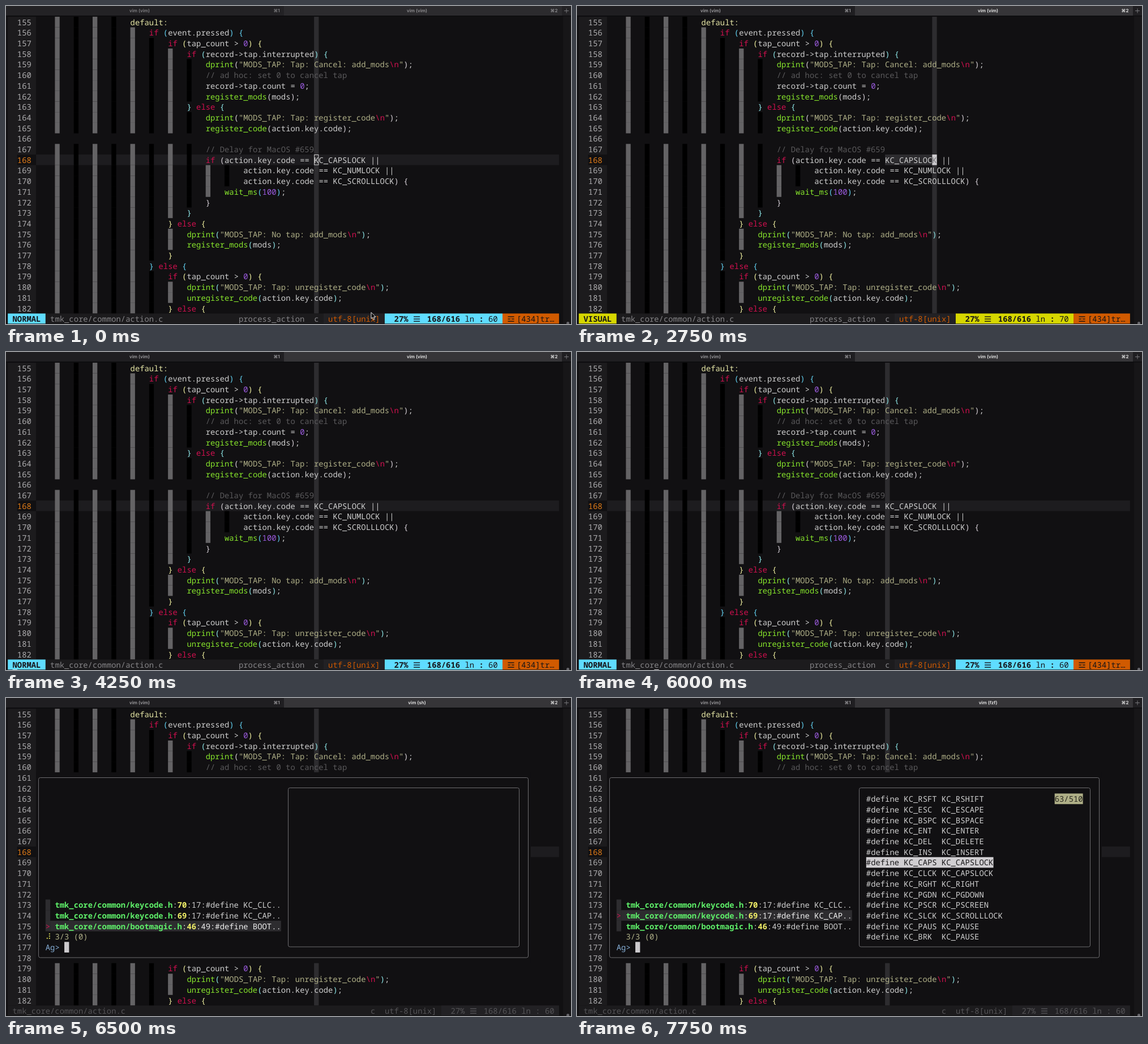
An HTML page with a canvas that plays this animation: 998 px wide and 561 px high, repeating every 8 s.

```html
<!DOCTYPE html>
<html lang="en">
<head>
<meta charset="utf-8">
<title>Searching a keycode in vim</title>
<style>
html, body { margin: 0; height: 100%; overflow: hidden; background: #111012; }
canvas { display: block; }
</style>
</head>
<body>
<canvas id="stage" width="998" height="561"></canvas>
<script>
const ctx = document.getElementById('stage').getContext('2d');
const LOOP = 8000, CELL = 8.322, ROW = 18.7, LEFT = 3.2, GUTTER = 6, TOP = 18.9, FIRST = 155;
const MONO = '"Noto Sans Mono", "DejaVu Sans Mono", monospace';
const UI = 'Inter, "DejaVu Sans", sans-serif';
const BG = '#111012', PANEL = '#1c1b1d', FG = '#cfcfcf', DIM = '#2d2c2f', RED = '#d0104f',
  TAN = '#afaf87', CYAN = '#5fdcff', YELLOW = '#d7d700', ORANGE = '#d05a00';
const RAINBOW = ['#62d2f2', '#f0f0a0', '#8fe9ea', '#d6cfd6'];

const T = { focus: 500, visual: 2250, extend: 2500, yank: 3250, command: 4000,
  paste: 5500, popup: 6250, loaded: 7000, up: 7250 };

const CODE = `
                    default:
                        if (event.pressed) {
                            if (tap_count > 0) {
                                if (record->tap.interrupted) {
                                    dprint("MODS_TAP: Tap: Cancel: add_mods\\n");
                                    // ad hoc: set 0 to cancel tap
                                    record->tap.count = 0;
                                    register_mods(mods);
                                } else {
                                    dprint("MODS_TAP: Tap: register_code\\n");
                                    register_code(action.key.code);

                                    // Delay for MacOS #659
                                    if (action.key.code == KC_CAPSLOCK ||
                                            action.key.code == KC_NUMLOCK ||
                                            action.key.code == KC_SCROLLLOCK) {
                                        wait_ms(100);
                                    }
                                }
                            } else {
                                dprint("MODS_TAP: No tap: add_mods\\n");
                                register_mods(mods);
                            }
                        } else {
                            if (tap_count > 0) {
                                dprint("MODS_TAP: Tap: unregister_code\\n");
                                unregister_code(action.key.code);
                            } else {`.slice(1).split('\n');

const DEFINES = `RSFT RSHIFT
ESC ESCAPE
BSPC BSPACE
ENT ENTER
DEL DELETE
INS INSERT
CAPS CAPSLOCK
CLCK CAPSLOCK
RGHT RIGHT
PGDN PGDOWN
PSCR PSCREEN
SLCK SCROLLLOCK
PAUS PAUSE
BRK PAUSE`.split('\n').map(line => {
  const [short, long] = line.split(' ');
  return `#define KC_${short.padEnd(4)} KC_${long}`;
});

const MATCHES = [
  ['keycode.h', '70', ':17:#define KC_CLC..'],
  ['keycode.h', '69', ':17:#define KC_CAP..'],
  ['bootmagic.h', '46', ':49:#define BOOT..'],
];

const TOKEN = /(?<comment>\/\/.*)|(?<string>"(?=\))|"[^"\\]*)|(?<keyword>\\n|\b(?:if|else)\b)|(?<label>default:)|(?<call>\w+(?=\())|(?<number>\b\d+\b)|(?<bracket>[(){}])|\w+|\S/g;
const COLORS = { comment: '#5a595b', string: TAN, keyword: RED, label: '#e6e6a6',
  call: '#87e52c', number: '#9c5be0' };

function highlight(lines) {
  let depth = 0;
  return lines.map(line => [...line.matchAll(TOKEN)].map(m => {
    const kind = Object.keys(m.groups).find(k => m.groups[k] !== undefined);
    let color = COLORS[kind] || FG;
    if (kind === 'bracket') {
      const level = '({'.includes(m[0]) ? depth++ : --depth;
      color = RAINBOW[level % RAINBOW.length];
    }
    return { text: m[0], col: m.index, color };
  }));
}
const TOKENS = highlight(CODE);

const colX = col => LEFT + col * CELL;
const rowY = row => TOP + row * ROW;

function rect(x, y, w, h, color) {
  ctx.fillStyle = color;
  ctx.fillRect(x, y, w, h);
}

function cells(col, row, count, color, rows = 1) {
  rect(colX(col), rowY(row), count * CELL, rows * ROW, color);
}

function text(str, col, row, color = FG, weight = 400) {
  ctx.font = `${weight} 13.87px ${MONO}`;
  ctx.fillStyle = color;
  ctx.fillText(str, colX(col), rowY(row) + 14.7);
}

function label(str, x, color) {
  ctx.font = `600 8px ${UI}`;
  ctx.textAlign = 'center';
  ctx.fillStyle = color;
  ctx.fillText(str, x, 11.3);
  ctx.textAlign = 'left';
}

function bars(col, color, split) {
  const x = colX(col) + 1.2, y = rowY(28) + 5;
  for (let i = 0; i < 3; i++) rect(x, y + i * 4, 11, 1.4, color);
  if (split) rect(x + 4, y + 4, 3, 1.4, ORANGE);
}

function frame(x, y, w, h) {
  ctx.strokeStyle = '#6d6c6f';
  ctx.lineWidth = 1;
  ctx.beginPath();
  ctx.roundRect(x, y, w, h, 3);
  ctx.stroke();
}

function drawTabs(t) {
  const focused = t >= T.focus;
  const title = t < T.popup ? 'vim' : t < T.loaded ? 'sh' : 'fzf';
  const idle = focused ? '#a2a1a4' : '#838285', active = focused ? '#f0f0f0' : '#939295';
  rect(0, 0, 998, 17, focused ? '#1f1e21' : '#232225');
  rect(491, 0, 491, 17, focused ? '#363538' : '#2c2b2e');
  rect(0, 17, 998, 1, '#08080a');
  label('vim (vim)', 236, idle);
  label('⌘1', 478, idle);
  label(`vim (${title})`, 726, active);
  label('⌘2', 968, active);
  rect(986, 8, 8, 1, '#77767a');
  rect(989.5, 4.5, 1, 8, '#77767a');
}

function drawEditor(t) {
  const visual = t >= T.visual && t < T.yank;
  const cursorCol = visual && t >= T.extend ? 69 : 59;
  const cursorRow = 13;
  cells(0, 0, GUTTER, PANEL, 28);
  cells(2, cursorRow, 4, BG);
  if (!visual) cells(GUTTER, cursorRow, 111, '#1d1c1f');

  CODE.forEach((line, row) => {
    const indent = line.search(/\S/);
    for (let col = 4; col < indent; col += 4)
      cells(GUTTER + col, row, 1, col % 8 ? '#646365' : '#000');
  });
  cells(GUTTER + cursorCol, 0, 1, DIM, 28);
  if (visual) cells(GUTTER + 59, cursorRow, cursorCol - 59, DIM);
  const block = t >= T.focus && t < T.command;
  if (block) cells(GUTTER + cursorCol, cursorRow, 1, '#cccacd');

  TOKENS.forEach((tokens, row) => {
    text(FIRST + row, 2, row, row === cursorRow ? '#e07c18' : '#aeadaf');
    for (const { text: str, col, color } of tokens) text(str, GUTTER + col, row, color);
  });
  if (block) text('K', GUTTER + cursorCol, cursorRow, '#77767a');
  if (t < T.focus) {
    ctx.strokeStyle = '#d0d0d0';
    ctx.lineWidth = 1;
    ctx.strokeRect(colX(GUTTER + cursorCol) + 0.5, rowY(cursorRow) + 0.5, CELL - 1, ROW - 1);
  }
}

function drawPosition(col, color, weight, column) {
  text('27%', col, 28, color, weight);
  bars(col + 4, color);
  text('168/616', col + 7, 28, color, weight);
  text('ln', col + 15, 28, color);
  text(':', col + 18, 28, color, weight);
  text(column, col + 20, 28, color);
}

function drawStatus(t) {
  const path = 'tmk_core/common/action.c';
  cells(0, 28, 117, PANEL);
  if (t >= T.popup) {
    const faint = '#555457';
    cells(92, 28, 25, '#222124');
    text(path, 1, 28, faint);
    text('c', 77, 28, faint);
    text('utf-8[unix]', 80, 28, faint);
    drawPosition(94, faint, 400, '60');
  } else {
    const visual = t >= T.visual && t < T.yank;
    const accent = visual ? YELLOW : CYAN, ink = '#161518', grey = '#858487';
    cells(0, 28, 8, accent);
    text(visual ? 'VISUAL' : 'NORMAL', 1, 28, ink, 700);
    text(path, 9, 28, grey);
    text('process_action', 49, 28, grey);
    text('c', 65, 28, grey);
    cells(67, 28, 13, '#222124');
    text('utf-8[unix]', 68, 28, ORANGE);
    cells(80, 28, 25, accent);
    drawPosition(82, ink, 600, visual && t >= T.extend ? '70' : '60');
    cells(105, 28, 12, ORANGE);
    bars(106, ink, true);
    text('[434]tr…', 108, 28, ink);
  }
  // Only the top edge of the command line is in view
  rect(0, 560.3, 998, 1, BG);
  if (t >= T.command && t < T.popup) {
    const typed = t >= T.paste ? 16 : 1 + Math.min(4, Math.floor((t - T.command) / 300));
    rect(colX(typed), 560, CELL, 1, '#cccacd');
  }
}

function drawPopup(t) {
  const selected = t < T.up ? 2 : 1, loading = t < T.loaded;
  cells(GUTTER, 6, 105, BG, 18);
  frame(57.5, 140.5, 865, 317.5);
  frame(498.5, 158.5, 408, 280.5);

  MATCHES.forEach(([file, line, rest], i) => {
    const row = 18 + i, on = i === selected, path = `tmk_core/common/${file}`;
    const lineCol = 11 + path.length;
    cells(8, row, 1, DIM);
    if (on) {
      cells(9, row, 49, DIM);
      text('>', 8, row, RED);
    }
    const plain = on ? '#efefef' : FG;
    text(path, 10, row, '#5ff06a', 700);
    text(':', lineCol - 1, row, plain);
    text(line, lineCol, row, '#f0ee68', 700);
    text(rest, lineCol + 2, row, plain);
  });
  if (loading) text('⠼', 8, 21, '#c8c850');
  text('3/3 (0)', 10, 21, TAN);
  text('Ag>', 8, 22, '#87afd7');
  cells(12, 22, 1, '#cccacd');

  if (t < T.up) return;
  DEFINES.forEach((line, i) => {
    const hit = i === 6;
    if (hit) cells(61, 8 + i, line.length, '#d0ced1');
    text(line, 61, 8 + i, hit ? '#19181a' : FG);
  });
  cells(101, 8, 6, TAN);
  text('63/510', 101, 8, '#29281f');
}

function drawPointer(t) {
  if (t >= T.visual) return;
  const p = Math.min(1, Math.max(0, (t - 250) / 1250));
  const ease = p * p * (3 - 2 * p);
  ctx.save();
  ctx.translate(645 - 13 * ease, 540.5 - 47 * ease);
  ctx.strokeStyle = '#f0f0f0';
  ctx.beginPath();
  if (t < T.focus) {
    ctx.fillStyle = '#000';
    ctx.lineWidth = 1;
    for (const [x, y] of [[0, 0], [0, 11], [2.5, 8.7], [4.3, 12.8], [6.2, 12], [4.5, 8], [8, 8]])
      ctx.lineTo(x, y);
    ctx.closePath();
    ctx.fill();
  } else {
    ctx.lineWidth = 1.4;
    ctx.moveTo(-3, -6.5);
    ctx.quadraticCurveTo(0, -6.5, 0, -4);
    ctx.lineTo(0, 4);
    ctx.quadraticCurveTo(0, 6.5, -3, 6.5);
    ctx.moveTo(3, -6.5);
    ctx.quadraticCurveTo(0, -6.5, 0, -4);
    ctx.moveTo(0, 4);
    ctx.quadraticCurveTo(0, 6.5, 3, 6.5);
    ctx.moveTo(-2, 2.5);
    ctx.lineTo(2, 2.5);
  }
  ctx.stroke();
  ctx.restore();
}

function draw(now) {
  const t = now % LOOP;
  rect(0, 0, 998, 561, BG);
  rect(984, 18, 14, 543, '#171618');
  drawTabs(t);
  drawEditor(t);
  drawStatus(t);
  if (t >= T.popup) drawPopup(t);
  ctx.fillStyle = '#66656a';
  ctx.beginPath();
  ctx.arc(992.5, 559.5, 2.5, 0, Math.PI * 2);
  ctx.fill();
  drawPointer(t);
  requestAnimationFrame(draw);
}

ctx.textRendering = 'geometricPrecision';
requestAnimationFrame(draw);
</script>
</body>
</html>
```
